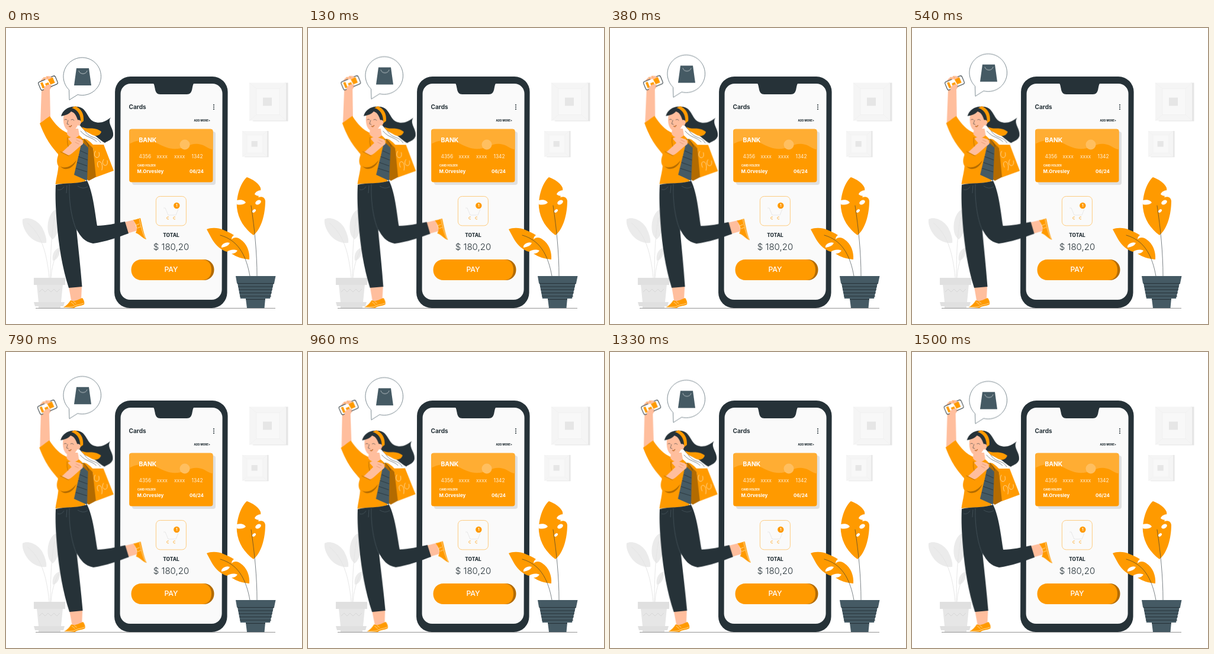
Recreate the animation shown at these times as an HTML page without scripts. Size 500 by 500 pixels, loop 1540 ms.

```html
<!DOCTYPE html>
<html lang="en">
<head>
<meta charset="utf-8">
<title>Card payment</title>
<style>
  html, body { margin: 0; width: 100%; height: 100%; overflow: hidden; background: #fff; }
  svg { display: block; width: 100vw; height: 100vh; }
  text { font-family: Inter, "Open Sans", sans-serif; }
  .bold { font-weight: 700; }
  .dark { fill: #263238; }
  .slate { fill: #455a64; }
  .orange { fill: #ff9a00; }
  .brown { fill: #b36b00; }
  .skin { fill: #ffbe9d; }
  .white { fill: #fff; }
  .line { fill: none; stroke: #263238; stroke-width: .6; stroke-linecap: round; stroke-linejoin: round; }
  .thin { fill: none; stroke-width: .6; stroke-linecap: round; }
  .woman { transform-origin: 120px 270px; animation: sway 1540ms infinite; }
  .bubble { animation: float 770ms linear infinite alternate; }
  @keyframes sway {
    0% { transform: rotate(0deg); animation-timing-function: cubic-bezier(.3, .6, .6, 1); }
    20% { transform: rotate(.65deg); animation-timing-function: cubic-bezier(.37, 0, .63, 1); }
    70% { transform: rotate(-.85deg); animation-timing-function: cubic-bezier(.4, 0, .7, .5); }
    100% { transform: rotate(0deg); }
  }
  @keyframes float {
    to { transform: translateY(-9px); }
  }
</style>
</head>
<body>
<svg viewBox="0 0 500 500">
  <!-- wall frames -->
  <defs>
    <g id="frame">
      <path fill="#e6e6e6" d="M60 0h5.500v65h-60z"/>
      <path fill="#f5f5f5" d="M0 0H62V64H0z"/>
      <path fill="none" stroke="#efefef" stroke-width=".7" d="M0 0 12 10H51L62 0M0 64 12 54H51L62 64M12 10V54M51 10V54"/>
      <path fill="#f8f8f8" d="M12.500 10.500H50.500V53.500H12.500z"/>
      <path fill="#e6e6e6" d="M23 25H38V39H23z"/>
    </g>
  </defs>
  <use href="#frame" x="411" y="92.500"/>
  <use href="#frame" transform="translate(399 174) scale(.68)"/>

  <!-- pale plant -->
  <g fill="#ebebeb">
    <path d="M28 323C40 317 58 328 63 341C67 350 69 357 68 363C56 364 44 359 36 348C30 339 27 331 28 323z"/>
    <path d="M83 307C73 313 69 330 71 343C72 350 75 354 79 357C90 350 98 310 83 307z"/>
    <path d="M91 371C82 373 77 382 79 393C87 392 92 382 91 371z"/>
    <path fill="none" stroke="#e4e4e4" stroke-width=".9" d="M36 329C55 345 68 368 73 422M82 320C77 345 75 380 75 422M89 375C81 390 77 405 76 422"/>
    <path fill="#e6e6e6" d="M52 433H96L93 463H55z"/>
    <path fill="#e0e0e0" d="M47 422H100V434H47zM47 463H99L97 470H49zM55 470H92V473H55z"/>
    <path fill="none" stroke="#d4d4d4" stroke-width=".8" d="M56 446 61 441 66 446 71 441 76 446 81 441 86 446 91 441"/>
  </g>

  <path stroke="#777" stroke-width=".8" d="M50 473.400H455"/>

  <!-- phone -->
  <g transform="translate(.9) skewX(-.17)">
    <rect class="dark" x="183.500" y="82" width="190.500" height="391" rx="26"/>
    <rect fill="#fafafa" x="193" y="94" width="172" height="365" rx="17"/>
    <path class="dark" d="M247 93C250 94 250 98 251 102C252 109 255 112 260 112H305C310 112 313 109 314 102C315 98 315 94 318 93z"/>
  </g>
  <text class="bold dark" x="207.500" y="137.400" font-size="10.100">Cards</text>
  <g class="dark">
    <circle cx="351" cy="130" r="1.100"/>
    <circle cx="351" cy="133.500" r="1.100"/>
    <circle cx="351" cy="137" r="1.100"/>
  </g>
  <text class="dark" x="317.500" y="158.300" font-size="4.500" font-weight="800">ADD MORE+</text>

  <!-- bank card -->
  <rect fill="#e0e0e0" x="213" y="175" width="141" height="90" rx="4"/>
  <rect class="orange" x="208.200" y="170.700" width="141.300" height="89.700" rx="4"/>
  <path fill="#ffad33" d="M208.200 196V174.700Q208.200 170.700 212.200 170.700H345.500Q349.500 170.700 349.500 174.700V205C342 205 336 197 325 196C312 194 305 202 290 204C276 205 268 201 256 195C242 188 222 188 208.200 196z"/>
  <circle fill="#ffbf60" cx="302" cy="197" r="8.500"/>
  <g class="white">
    <text class="bold" x="224.500" y="193" font-size="10.300">BANK</text>
    <g font-size="8.400" fill="#fff0d8">
      <text x="224.500" y="220.300">4356</text>
      <text x="254.500" y="220.300">xxxx</text>
      <text x="284" y="220.300">xxxx</text>
      <text x="313.500" y="220.300">1342</text>
    </g>
    <text class="bold" x="222" y="234" font-size="4.300">CARD HOLDER</text>
    <text class="bold" x="221.500" y="245.200" font-size="8">M.Orvesley</text>
    <text class="bold" x="310" y="245.200" font-size="8">06/24</text>
  </g>

  <!-- cart and total -->
  <rect fill="#fafafa" stroke="#ffb84d" stroke-width=".7" x="253.400" y="284.400" width="51" height="49.500" rx="7"/>
  <path fill="none" stroke="#e0e0e0" stroke-width=".7" d="M266 304H269L274 316H287L291 306"/>
  <path fill="none" stroke="#ff9a00" stroke-width=".7" d="M275 319.500A2 2 0 1 0 275 322.500M286 319.500A2 2 0 1 0 286 322.500"/>
  <circle class="orange" cx="288.300" cy="300" r="5.200"/>
  <text class="bold white" x="288.300" y="302.300" font-size="6" text-anchor="middle">1</text>
  <text class="dark" x="279" y="353.300" font-size="8.300" font-weight="800" text-anchor="middle">TOTAL</text>
  <text class="dark" x="279" y="374.700" font-size="15" font-weight="300" text-anchor="middle">$ 180,20</text>
  <rect class="brown" x="216" y="391" width="135.500" height="35" rx="17"/>
  <path class="orange" d="M229 391H331C341 391 347 398 347 408.500C347 419 341 426 331 426H229C218 426 211.500 418 211.500 408.500C211.500 399 218 391 229 391z"/>
  <text class="white" x="279" y="412.300" font-size="12.200" font-weight="500" text-anchor="middle">PAY</text>

  <!-- orange plant -->
  <path class="orange" d="M407 252C399 258 389 279 390 303C392 323 403 339 418 350C431 340 438 315 438 292C437 286 433 284 426 286C429 281 431 276 430 270C426 261 417 256 407 252z"/>
  <path class="white" d="M390 291C397 289 403 291 405 295C401 299 395 299 390 298zM431 274C426 274 421 277 420 281C424 284 428 285 431 282z"/>
  <ellipse class="white" cx="426" cy="294.500" rx="5.200" ry="3.400" transform="rotate(-30 426 294.500)"/>
  <ellipse class="white" cx="419" cy="309" rx="3.500" ry="2.200" transform="rotate(-40 419 309)"/>
  <path class="orange" d="M339 340C346 337 358 337 367 341C374 344 381 347 385 350C382 352 381 354 381 357C385 353 391 353 396 357C407 364 412 378 411 391C400 390 389 387 381 381C386 381 389 379 391 376C384 373 378 375 373 378C360 374 351 363 346 353z"/>
  <path class="white" d="M364 368C367 363 373 361 378 363C376 368 370 370 364 371z"/>
  <path class="line" d="M414 300C420 340 424 380 424 419M362 350C390 358 405 380 412 419"/>
  <path class="slate" d="M388 419H455.500L453 431H390zM391 431H452L446 457H396zM405 457H438L436.500 473H407z"/>
  <path fill="none" stroke="#263238" stroke-width="1" d="M390.500 431.500H453M392 437H451M393 442H450M394 447.500H449M395 453H448M405 458.500H438"/>

  <!-- speech bubble -->
  <g class="bubble">
    <path fill="#fff" stroke="#455a64" stroke-width=".7" stroke-linejoin="round" d="M106.500 104.500A31.800 31.800 0 1 1 121 112.600L107 121.500z"/>
    <path class="slate" d="M119 68H140L144 97H115z"/>
    <path class="thin" stroke="#fff" d="M123 72.500C125 79 135 79 137 72.500"/>
  </g>

  <g class="woman">
    <!-- raised arm and mobile -->
    <path class="skin" d="M60 104C55 96 57 88 63 84L72 81C78 83 82 89 80 95L74 104L75 152L58 164z"/>
    <g transform="rotate(-23 71 93)">
      <rect fill="#fff" stroke="#263238" stroke-width="1" x="55.500" y="85.500" width="31" height="15" rx="3"/>
      <path class="orange" d="M59 88H63V98H59zM66 92H72V98H66zM73 87H82V97H74z"/>
    </g>
    <path class="skin" d="M61 87 64 83 67 85 69 81 72 83 75 81 77 84 72 87zM64 101C67 96 74 94 77 97L72 105 64 106z"/>
    <path class="thin" stroke="#ff9a00" d="M64 84 66 87M69 82 71 85"/>
    <path class="orange" d="M57 161C62 158 69 152 74 149C83 163 92 172 105 178L122 180C130 186 134 191 134 199L134 259C116 264 98 262 83.500 264C86 247 91 234 88 213C76 199 67 188 57 161z"/>

    <!-- head -->
    <path class="dark" d="M116 133C137 131 136 153 148 158C158 162 167 159 177 151C170 161 183 170 181 182C179 189 173 190 167 194C161 192 152 181 143 178C130 174 127 166 121 160z"/>
    <path class="line" d="M130 168C140 190 152 180 160 194M126 174C136 186 146 184 153 192"/>
    <path class="skin" d="M104 170H122L124 181C117 189 106 185 103 179z"/>
    <path class="skin" d="M98 145C95 158 98 173 108 174C119 173 125 163 123 145C116 135 104 136 98 145z"/>
    <path class="dark" d="M93 149C96 137 110 130 121 134C130 140 130 153 127 161L122 158C119 148 116 143 110 141C106 146 99 148 93 149z"/>
    <path class="orange" d="M111 135C124 139 127 151 126 161L131 157C132 145 127 136 117 132z"/>
    <path class="orange" d="M128 167C139 173 147 165 161 175C159 183 150 184 143 179C137 175 132 175 128 167z"/>
    <path class="skin" d="M120 156C126 153 129 160 124 165L120 164z"/>
    <path class="line" d="M99 155Q101 153 103 155M110 155Q113 153 115 156M105 156 103 162 106 163"/>
    <path class="orange" stroke="#8a3e20" stroke-width=".5" d="M106 166Q109 167 111 164Q110 169 106 166z"/>

    <!-- bags -->
    <path class="brown" d="M131 187 146 199 157 249 140 258 134 254z"/>
    <path class="orange" d="M131 187C137 187 142 192 147 197L165 197 182 241 152 252 147 203z"/>
    <path class="thin" stroke="#fff" d="M151 208C144 220 161 224 157 210M156 235C149 222 166 221 162 240M165 222C158 232 174 238 171 224"/>
    <path class="slate" d="M128 192 139 202 137 258 115 248z"/>
    <path fill="none" stroke="#263238" stroke-width=".8" d="M125 207 138 213M122 217 138 223M120 227 137 233M118 237 137 243"/>
    <path class="line" d="M128 192C127 185 135 186 140 200"/>

    <!-- folded arm -->
    <path class="skin" d="M92 212C101 205 111 193 119 188C126 185 131 190 130 196C121 203 111 212 103 220z"/>
    <path class="orange" d="M92 208C84 219 84 234 94 237C105 238 115 230 122 218L125 203C117 208 110 214 105 215z"/>
    <path class="brown" d="M91 233C99 239 111 234 119 223C116 234 101 245 91 233z"/>
    <path class="thin" stroke="#8f5600" d="M92 209 106 216M104 185Q103 194 105 200"/>
    <path class="skin" d="M105 187C111 182 117 185 124 187L130 190 127 198 117 201z"/>
    <path class="thin" stroke="#d88762" d="M119 189 125 192M117 193 123 196"/>

    <!-- legs -->
    <path class="skin" d="M106 437H128L127 459 111 465zM200 328 216 324 222 342 205 347z"/>
    <path class="dark" d="M84 265C100 261 119 264 137 258C147 278 150 310 154 334C169 334 185 330 201 327L207 347C188 354 168 361 147 364C132 361 126 352 119 340C122 370 126 405 128.500 437L106 439C95 405 89 367 86 330C84 304 83 286 84 265z"/>
    <path fill="none" stroke="#5b6b73" stroke-width=".5" d="M107 264C106 297 112 327 120 343M87 273Q94 275 98 268M121 267Q130 273 138 268M103 266 102 279"/>

    <!-- shoes -->
    <path class="orange" d="M97 472C102 469 106 465 109 460C115 463 121 459 129 456C132 460 133 464 132 467C126 470 119 469 115 473z"/>
    <path class="thin" stroke="#fff" d="M99 472 113 471C118 467 125 468 131 465M110 463 115 467M114 462 118 465"/>
    <path class="orange" d="M215 324C219 324 222 322 227 321C230 333 232 346 237 357C231 356 227 349 219 346C224 338 219 331 215 324z"/>
    <path class="thin" stroke="#fff" d="M225 322C228 334 230 346 235 355M220 333 225 331M222 338 227 336"/>
  </g>
</svg>
</body>
</html>
```
